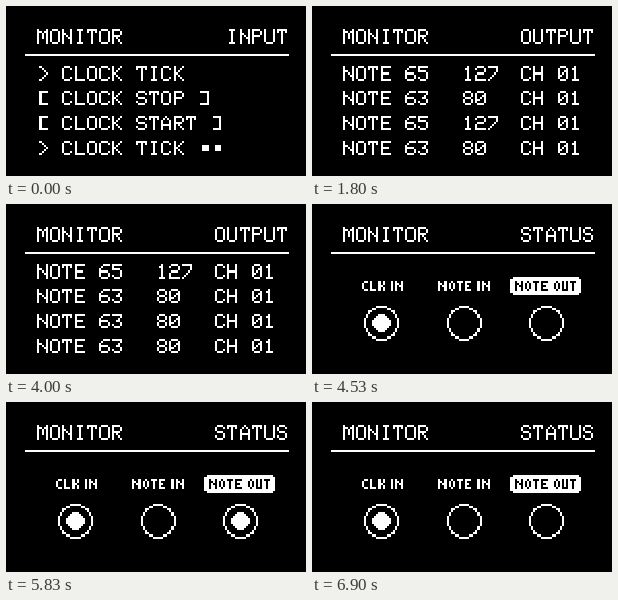
An HTML page with a canvas that plays this animation: 300 px wide and 170 px high, repeating every 6930 ms.

```html
<!DOCTYPE html>
<html>
<head>
<meta charset="utf-8">
<style>
html, body { margin: 0; width: 100%; height: 100%; overflow: hidden; background: #000; }
canvas { display: block; }
</style>
</head>
<body>
<canvas id="stage" width="300" height="170"></canvas>
<script>
const ctx = document.getElementById('stage').getContext('2d');
const LOOP = 6930;

// Glyphs as strokes: each word is a polyline of xy digit pairs on the display grid.
const LARGE = {
  M: '0600224046 2224', O: '103041453616050110', N: '0600 1234 4046', I: '1030 2026 1636',
  T: '01004041 2026', R: '06003041423303 2446', U: '000516364540', P: '06003041423303',
  S: '413010010213334445361605', A: '0602204246 0444', C: '4130100105163645', L: '000646',
  K: '0006 401346', E: '40000646 0333', H: '0006 4046 0343',
  '>': '104316', '[': '40101646', ']': '10404616', '.': '2242 2343 2444',
  0: '103041453616050110 1432', 1: '112026 1636', 2: '01103041423313040646',
  3: '00404123334445361605', 5: '400002324345361605', 6: '40200205163645443313', 7: '00404206',
  8: '103041423313020110 1304051636454433'
};
const SMALL = {
  C: '2010010314' + '24', L: '000424', K: '0004 201224', I: '0004', N: '0400 1122 3034',
  O: '102123140' + '30110', T: '0020 1014', E: '20000424 0212', U: '00042420'
};
const SMALL_WIDTH = { N: 4, I: 1, ' ': 1 };

// 128 x 64 display grid to stage pixels
const px = v => Math.round(19 + v * 2.0625);

function block(x, y, w = 1, h = 1) {
  ctx.fillRect(px(x), px(y), px(x + w) - px(x), px(y + h) - px(y));
}

function glyph(strokes, x, y) {
  for (const stroke of strokes.split(' ')) {
    const points = stroke.match(/../g).map(p => [+p[0], +p[1]]);
    for (let i = 1; i < points.length; i++) {
      const [ax, ay] = points[i - 1], [bx, by] = points[i];
      const n = Math.max(Math.abs(bx - ax), Math.abs(by - ay));
      for (let k = 0; k <= n; k++) {
        block(x + ax + Math.round((bx - ax) * k / n), y + ay + Math.round((by - ay) * k / n));
      }
    }
  }
}

function text(str, x, y) {
  [...str].forEach((c, i) => c !== ' ' && glyph(LARGE[c], x + i * 6, y));
}

function label(str, x, y) {
  for (const c of str) {
    if (c !== ' ') glyph(SMALL[c], x, y);
    x += (SMALL_WIDTH[c] ?? 3) + 1;
  }
}

function lamp(cx, cy, lit) {
  for (let y = -8; y <= 8; y++) {
    for (let x = -8; x <= 8; x++) {
      const r = Math.hypot(x, y);
      if (Math.abs(r - 8) < 0.5 || (lit && r < 4.2)) block(cx + x, cy + y);
    }
  }
}

const rowY = i => 20 + i * 12;

function drawInput(t) {
  const dots = t < 300 ? '..' : '...';
  ['> CLOCK TICK', '[ CLOCK STOP ]', '[ CLOCK START ]', '> CLOCK TICK ' + dots]
    .forEach((line, i) => text(line, 6, rowY(i)));
}

// The log scrolls up by one line at each of these times
const NOTES = [63, 65, 58];
const HISTORY = [1, 0, 2, 1, 0, 1, 0, 1, 0, 1, 0, 2, 1, 0, 1, 0, 1, 0, 0, 0];
const PUSHES = [1000, 1200, 1400, 1600, 1800, 2000, 2200, 2600, 2800,
  3170, 3170, 3370, 3570, 3770, 3970, 4000];

function drawOutput(t) {
  const first = PUSHES.filter(p => p <= t).length;
  HISTORY.slice(first, first + 4).forEach((n, i) => {
    text('NOTE ' + NOTES[n], 6, rowY(i));
    text(n === 1 ? '127' : '80', 64, rowY(i));
    text('CH 01', 92, rowY(i));
  });
}

function drawStatus(t) {
  label('CLK IN', 15, 28);
  label('NOTE IN', 52, 28);
  block(87, 27, 34, 7);
  block(88, 26, 32, 9);
  ctx.fillStyle = '#000';
  label('NOTE OUT', 89, 28);
  ctx.fillStyle = '#fff';
  lamp(24, 48, true);
  lamp(64, 48, false);
  lamp(104, 48, t >= 4870 && (t + 30) % 200 < 95);
}

function draw(t) {
  ctx.fillStyle = '#000';
  ctx.fillRect(0, 0, 300, 170);
  ctx.fillStyle = '#fff';
  const title = t < 830 ? 'INPUT' : t < 4370 ? 'OUTPUT' : 'STATUS';
  text('MONITOR', 6, 2);
  text(title, 128 - title.length * 6, 2);
  block(0, 14, 128);
  if (t < 830) drawInput(t);
  else if (t < 4200) drawOutput(t);
  else drawStatus(t);
}

function tick() {
  draw(performance.now() % LOOP);
  requestAnimationFrame(tick);
}
tick();
</script>
</body>
</html>
```
